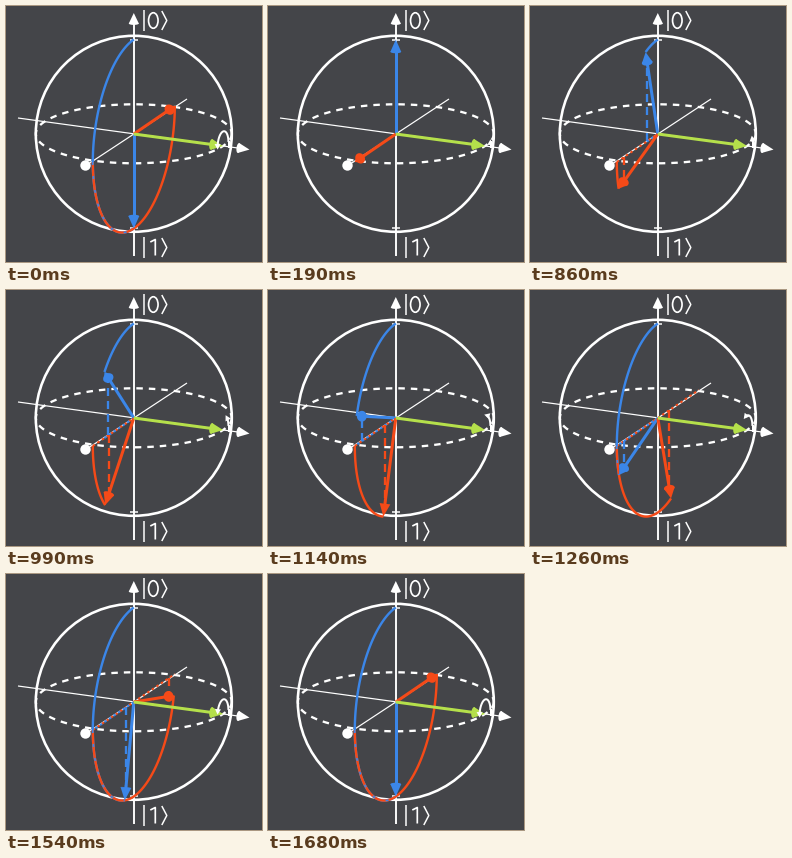
These frames come from a looping animation (256 px wide and 256 px high, 1.95 s). A matplotlib script:

```python
import numpy as np
import matplotlib.pyplot as plt
from matplotlib.animation import FuncAnimation
from matplotlib.patches import Circle, Ellipse, Polygon

SIZE, DPI, TICK, LOOP = 256, 100, 10, 1950
PT = 72 / DPI
BG, WHITE = "#444549", "#ffffff"
BLUE, RED, GREEN = "#3b86e8", "#f54a18", "#b5e04b"

O = np.array([127.8, 128.0])
# screen x, screen y, depth towards the viewer
X = np.array([-41, 28, 84.0])
Y = np.array([89.3, 12, 40.0])
Z = np.array([0, -94.5, 27.0])
BASE = 0.87

# the turn advances in held steps
STEPS = np.array([720, 790, 860, 920, 990, 1060, 1140, 1190,
                  1260, 1330, 1400, 1470, 1540, 1610, 1680])

fig = plt.figure(figsize=(SIZE / DPI, SIZE / DPI), dpi=DPI, facecolor=BG)
ax = fig.add_axes([0, 0, 1, 1])
ax.set_xlim(0, SIZE)
ax.set_ylim(SIZE, 0)
ax.axis("off")


def flat(v):
    return O + np.asarray(v)[..., :2]


def line(pts, color, width, z, dash=None):
    pts = np.asarray(pts)
    style = "-" if dash is None else (0, tuple(d / width for d in dash))
    return ax.plot(pts[:, 0], pts[:, 1], color=color, lw=width * PT, ls=style,
                   dash_capstyle="butt", solid_capstyle="butt", zorder=z)[0]


def shape(pts, color, z):
    return ax.add_patch(Polygon(pts, closed=True, fc=color, ec="none", zorder=z))


def cone(base, tip, depth, r, color, z):
    """Arrowhead: foreshortened base disc plus the point."""
    d = tip - base
    d = d / np.hypot(*d)
    n = np.array([-d[1], d[0]])
    a = np.linspace(0, 2 * np.pi, 40)[:, None]
    disc = base + r * (np.cos(a) * n + np.sin(a) * d * abs(depth))
    return [shape(disc, color, z), shape([base + r * n, tip, base - r * n], color, z)]


def arrow(v, color, z):
    depth = v[2] / np.linalg.norm(v)
    base = flat(BASE * v)
    return [line([O, base], color, 3, z)] + cone(base, flat(v), depth, 5.4, color, z)


def ket(digit, x, y):
    line([(x, y - 10), (x, y + 11)], WHITE, 1.5, 5)
    line([(x + 17.5, y - 9), (x + 22.5, y + 0.5), (x + 17.5, y + 10)], WHITE, 1.5, 5)
    if digit:
        line([(x + 6, y - 5), (x + 11, y - 7.5), (x + 11, y + 8.5)], WHITE, 1.7, 5)
    else:
        ax.add_patch(Ellipse((x + 9, y + 0.5), 9.5, 15.5, fill=False, ec=WHITE,
                             lw=1.7 * PT, zorder=5))


def scene():
    ax.add_patch(Circle((127.8, 127.8), 98, fill=False, ec=WHITE, lw=2.6 * PT, zorder=1))
    a = np.linspace(0, 2 * np.pi, 300)
    line(np.c_[127.8 + 98 * np.cos(a), 127.8 + 29.5 * np.sin(a)],
         WHITE, 2.3, 1, (6.5, 6))
    line([(12, 112), (234, 142.3)], WHITE, 1.2, 2)
    line([(80, 159.5), (181, 93)], WHITE, 1.2, 2)
    line([(127.9, 16), (127.9, 249.5)], WHITE, 1.9, 2)
    for y in (33.5, 222):
        line([(124, y), (131.5, y)], WHITE, 1.5, 2)
    line([(222.5, 134.5), (222.5, 141.5)], WHITE, 2, 2)
    cone(np.array([127.8, 17.5]), np.array([127.8, 7]), 0.28, 5, WHITE, 2)
    cone(np.array([232.5, 142]), np.array([243.5, 143.6]), 0.4, 5, WHITE, 2)
    ax.add_patch(Circle((79.5, 159.5), 5.2, fc=WHITE, ec="none", zorder=3))
    arrow(Y, GREEN, 8)
    ket(0, 138.3, 14)
    ket(1, 138.3, 241)


def angle(t):
    if t < 190:
        return np.pi
    if t < STEPS[0]:
        return 0.0
    k = np.searchsorted(STEPS, t, side="right") - 1
    if k == len(STEPS) - 1:
        return np.pi
    u = np.interp(k, [0, 4, 6, 10, 14], [0.065, 0.336, 0.437, 0.697, 0.96])
    return np.pi * (1 - np.cos(np.pi * u)) / 2


def arc(start, end, a0, a1):
    a = np.linspace(a0, a1, 80)[:, None]
    return flat(np.cos(a) * start + np.sin(a) * end)


def spin_mark(th):
    """Small curved arrow turning about the horizontal axis."""
    c = np.array([217, 138.5])
    p, q = np.array([5.4, -2.6]), np.array([0, -13.0])
    a = np.linspace(0, th, 40)[:, None]
    pts = c + np.cos(a) * p + np.sin(a) * q
    d = -np.sin(th) * p + np.cos(th) * q
    d = d / np.hypot(*d)
    n = np.array([-d[1], d[0]])
    tip, back = pts[-1] + 2.5 * d, pts[-1] - 3 * d
    out = [shape([tip, back + 3 * n, back - 3 * n], WHITE, 9)]
    if th > 0:
        out.append(line(pts, WHITE, 2, 9))
    return out


def projections(th, blue, red):
    """Dashed drops to the axis and dots along it."""
    s, c = np.sin(th), np.cos(th)
    past = th > np.pi / 2
    return [
        line([flat(BASE * s * X), flat(BASE * blue)], BLUE, 2.3, 4, (8, 5)),
        line([flat(BASE * c * X), flat(BASE * red)], RED, 2.3, 4, (8, 5)),
        line([flat(X), flat(-X) if past else O], RED, 2, 3, (2.5, 3)),
        line([O, flat((1 if past else s) * X)], BLUE, 2, 3, (2.5, 3)),
    ]


moving = []


def update(i):
    for m in moving:
        m.remove()
    moving.clear()
    th = angle(i * TICK)
    blue = np.cos(th) * Z + np.sin(th) * X
    red = np.cos(th) * X - np.sin(th) * Z
    if th > 0:
        moving.append(line(arc(Z, X, 0, th), BLUE, 2.4, 4))
        moving.append(line(arc(X, -Z, 0, th), RED, 2.4, 4.1))
        if th > np.pi / 2:
            # the two paths overlap here and shimmer
            moving.append(line(arc(Z, X, np.pi / 2, th), BLUE, 1.6, 4.2, (3, 11)))
        if th < np.pi:
            moving.extend(projections(th, blue, red))
    moving.extend(arrow(blue, BLUE, 6))
    moving.extend(arrow(red, RED, 7))
    moving.extend(spin_mark(th))
    return moving


scene()
anim = FuncAnimation(fig, update, frames=LOOP // TICK, interval=TICK,
                     init_func=lambda: update(0), repeat=True, repeat_delay=0, blit=False)
plt.show()
```
